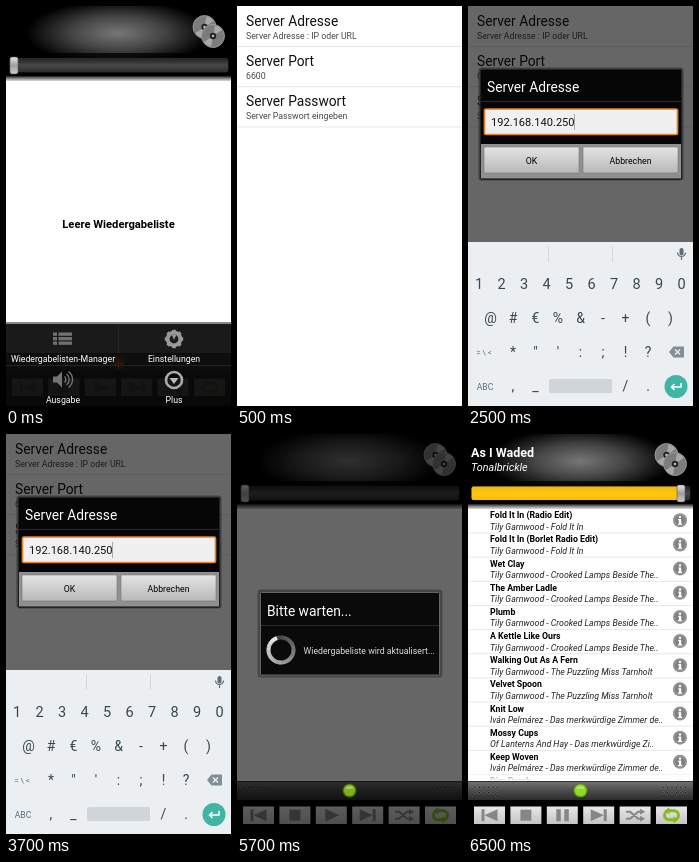
Recreate the animation shown at these times as an HTML page. Size 225 by 400 pixels, loop 8 s.

```html
<!DOCTYPE html>
<html lang="de">
<head>
<meta charset="utf-8">
<title>Musikspieler</title>
<style>
  html, body { margin: 0; width: 100%; height: 100%; overflow: hidden; background: #fff; }
  svg { display: block; width: 100%; height: 100%; }
  text { font: 8.75px Roboto, sans-serif; white-space: pre; }
  .b { font-weight: 700; }
  .i { font-style: italic; }
  .big { font-size: 13.75px; }
  .mid { text-anchor: middle; }
  .scene { display: none; }
</style>
</head>
<body>
<svg id="stage" viewBox="0 0 225 400" preserveAspectRatio="none"></svg>
<script>
const rect = (x, y, w, h, fill, more = '') =>
  `<rect x="${x}" y="${y}" width="${w}" height="${h}" fill="${fill}" ${more}/>`;
const circle = (x, y, r, fill, more = '') => `<circle cx="${x}" cy="${y}" r="${r}" fill="${fill}" ${more}/>`;
const path = (d, fill, more = '') => `<path d="${d}" fill="${fill}" ${more}/>`;
const line = (d, color, width = 1) => path(d, 'none', `stroke="${color}" stroke-width="${width}"`);
const text = (x, y, s, fill, cls = '', size = 0) =>
  `<text x="${x}" y="${y}" fill="${fill}" class="${cls}" ${size ? `style="font-size:${size}px"` : ''}>${s}</text>`;
const at = (x, y, s) => `<g transform="translate(${x} ${y})">${s}</g>`;
const range = n => [...Array(n).keys()];
const shade = (id, ...stops) => `<linearGradient id="${id}" x2="0" y2="1">` +
  stops.map((c, i) => `<stop offset="${i / (stops.length - 1)}" stop-color="${c}"/>`).join('') + '</linearGradient>';
const dim = rect(0, 0, 225, 400, '#000', 'opacity=".6"');

const defs = `<defs>
  <radialGradient id="glow"><stop stop-color="#777"/><stop offset=".5" stop-color="#444"/><stop offset="1" stop-color="#000"/></radialGradient>
  ${shade('groove', '#222', '#484848', '#2c2c2c')}
  ${shade('gold', '#f4b400', '#ffc814', '#fcbc00')}
  ${shade('knob', '#e4e4e4', '#a0a0a0', '#ccc')}
  ${shade('edge', '#1c1c1c', '#888', '#ddd')}
  ${shade('bar', '#747474', '#4c4c4c', '#2c2c2c')}
  ${shade('key', '#e8e8e8', '#c4c4c4')}
  ${shade('button', '#e4e4e4', '#b8b8b8')}
  ${shade('fade', '#fff0', '#fff')}
</defs>`;

// Player frame
const disc = (x, y) => at(x, y,
  circle(0, 0, 11.5, '#7c7c7c', 'stroke="#a4a4a4" stroke-width=".8"') +
  path('M0 0L2-10.5A11 11 0 0 1 9-6zM0 0L-2 10.5A11 11 0 0 1-9 6z', '#a8a8a8') +
  circle(0, 0, 3.2, '#222') + circle(0, 0, 1.3, '#bbb'));

const slider = (x, filled) =>
  rect(4, 52.5, 218, 13.5, 'url(#groove)', 'rx="2" stroke="#3c3c3c" stroke-width=".6"') +
  (filled ? rect(3.5, 52.5, x - 1.5, 13.5, 'url(#gold)', 'rx="2"') : '') +
  rect(x, 51, 8, 17, 'url(#knob)', 'rx="2" stroke="#555" stroke-width=".6"');

const ink = '#868686';
const glyphs = {
  prev: path('M-8-6h3v12h-3zM8-6v12L-5 0z', ink),
  stop: rect(-5.5, -5.5, 11, 11, ink),
  play: path('M-6-6.5L8 0-6 6.5z', ink),
  pause: path('M-6-6h4.5v12h-4.5zM2-6h4.5v12h-4.5z', ink),
  next: path('M5-6h3v12h-3zM-8-6v12L5 0z', ink),
  shuffle: line('M-9-3.5h4L3 3.5h3M-9 3.5h4L3-3.5h3', ink, 2) + path('M5-6.5l5 3-5 3zM5 .5l5 3-5 3z', ink),
  repeat: rect(-7, -4.5, 14, 9, 'none', 'rx="4.5" stroke="#86bc1c" stroke-width="3"') +
    path('M-2-8v7l-5-3.5zM2 8V1l5 3.5z', '#86bc1c')
};

const dots = x => range(12).map(i =>
  circle(x + (i % 6) * 4.5, 353.5 + (i / 6 | 0) * 5, 1, '#111', 'stroke="#999" stroke-width=".4"')).join('');
const orb = (ring, core) => circle(112.5, 356.5, 7, ring) + circle(112.5, 356.3, 5.8, core) +
  path('M108.5 355a4 3 0 0 1 8 0z', '#fff', 'opacity=".3"');

const player = (x, filled, middle) =>
  rect(0, 0, 225, 400, '#fff') + rect(0, 0, 225, 72, '#000') +
  '<ellipse cx="112" cy="27" rx="92" ry="33" fill="url(#glow)"/>' +
  rect(0, 47, 225, 25, '#000', 'opacity=".75"') +
  disc(198.5, 21) + disc(207, 30) + slider(x, filled) +
  rect(0, 70, 225, 5, 'url(#edge)') +
  rect(0, 347, 225, 53, '#000') + rect(0, 347, 225, 19, 'url(#bar)') +
  line('M0 347.5H225', '#333') + dots(7) + dots(195) + orb('#5c9a14', '#90d824') +
  ['prev', 'stop', middle, 'next', 'shuffle', 'repeat'].map((g, i) =>
    rect(6 + i * 36.4, 372.5, 31, 17.5, 'url(#key)') + at(21.5 + i * 36.4, 381.2, glyphs[g])).join('');

// Options menu over the empty playlist
const gear = range(8).map(i => rect(-1.8, -9.2, 3.6, 4, '#999', `transform="rotate(${i * 45})"`)).join('') +
  circle(0, 0, 8.3, '#999') + circle(0, 0, 4.4, '#1a1a1a') + path('M-2.4-4.4h4.8L0 1z', '#999');
const listIcon = [-6, -1.5, 3].map(y => rect(-9.5, y, 4, 3.3, '#707070') + rect(-4, y, 13.5, 3.3, '#707070')).join('');
const speaker = path('M-9.5-3h4l5-5V8l-5-5h-4z', '#747474') +
  line('M2-3a4 4 0 0 1 0 6M4-5.5a7 7 0 0 1 0 11M6-8a10 10 0 0 1 0 16', '#747474', 1.4);
const more = circle(0, 0, 8, 'none', 'stroke="#aaa" stroke-width="2.6"') + path('M-4.5-2h9L0 4z', '#bbb');

const menu = player(4, false, 'play') +
  text(112.5, 222, 'Leere Wiedergabeliste', '#000', 'b mid', 11.2) +
  rect(0, 318, 225, 82, '#0a0a0a', 'opacity=".94"') + rect(0, 318, 225, 29, '#1a1a1a') +
  rect(0, 316, 225, 2, '#888') + line('M112.5 318V347M0 359.5H225', '#242424') +
  line('M107 357.5h11M112.5 352v11', '#4a0c0c', 1.5) +
  at(56.5, 332.5, listIcon) + at(168, 333, gear) + at(56.5, 373.5, speaker) + at(168, 374, more) +
  text(57, 355.5, 'Wiedergabelisten-Manager', '#fff', 'mid') + text(168, 355.5, 'Einstellungen', '#fff', 'mid') +
  text(57, 397, 'Ausgabe', '#fff', 'mid') + text(168, 397, 'Plus', '#fff', 'mid');

// Server settings
const settings = rect(0, 0, 225, 400, '#fff') + [
  ['Server Adresse', 'Server Adresse : IP oder URL'],
  ['Server Port', '6600'],
  ['Server Passwort', 'Server Passwort eingeben']
].map(([name, note], i) => {
  const y = i * 40.2;
  return text(9, y + 19.6, name, '#111', 'big') + text(9, y + 32.8, note, '#484848') +
    line(`M0 ${y + 40.5}H225`, '#e6e6e6');
}).join('');

// Address dialog with keyboard
const keyRow = (keys, x, y, size) => [...keys].map((k, i) =>
  text(x + i * 22.5, y, k.replace('&', '&amp;'), '#37474f', 'mid', size)).join('');
const keyboard = rect(0, 236, 225, 164, '#eceff1') +
  line('M80.5 241V256M144.5 241V256', '#d2d7da') +
  at(213.5, 248, rect(-2, -6, 4, 7.5, '#607078', 'rx="2"') + line('M-4-1.5a4 4 0 0 0 8 0M0 2.5V6', '#607078', 1.2)) +
  keyRow('1234567890', 11.2, 283, 14.5) + keyRow('@#€%&-+()', 22.5, 317, 14) +
  keyRow('*"\':;!?', 45, 351, 14) +
  text(16, 349, '= \\ &lt;', '#546e7a', 'mid', 8) + text(17, 384, 'ABC', '#546e7a', 'mid', 8.5) +
  keyRow(',_', 45, 385, 14) + keyRow('/.', 157.5, 385, 14) +
  rect(81, 373, 63, 14, '#cfd5d8', 'rx="1.5"') +
  at(209, 346, path('M-8 0l4.5-5.5H7v11H-3.5z', '#80909a') + line('M-2-2.5l5 5M3-2.5l-5 5', '#eceff1', 1.3)) +
  circle(208, 380.5, 11.5, '#40b5a6') +
  line('M213 377v4h-9M206.5 378l-3 3 3 3', '#fff', 1.5);

const pushButton = (x, label) => rect(x, 141, 95, 26, 'url(#button)', 'rx="1" stroke="#777" stroke-width=".6"') +
  text(x + 47.5, 157.5, label, '#000', 'mid');
const address = settings + dim +
  rect(10.5, 61.5, 205, 113, '#333', 'rx="3" opacity=".75"') +
  rect(12.5, 63.5, 201, 110, '#060606', 'rx="1"') +
  text(19, 86, 'Server Adresse', '#fff', 'big') + line('M13 95.5H213', '#2a2a2a') +
  rect(16.5, 103, 193, 25.5, '#f0f0f0', 'rx="1.5" stroke="#e88424" stroke-width="1.7"') +
  text(23, 120, '192.168.140.250', '#111', '', 11.1) + line('M106.5 108V124', '#888', .7) +
  rect(13, 138, 200, 34.5, '#909090') + pushButton(16, 'OK') + pushButton(115, 'Abbrechen') + keyboard;

// Waiting dialog
const spinner = range(60).map(i => {
  const v = 70 + i * 2.9 | 0;
  return line('M0-12.5A12.5 12.5 0 0 1 1.6-12.4', `rgb(${v},${v},${v})`, `4" transform="rotate(${i * 6 - 20})`);
}).join('');
const waiting = player(4, false, 'play') + dim + orb('#40640c', '#80b018') +
  rect(20.5, 155.5, 185, 88, '#333', 'rx="3" opacity=".6"') +
  rect(23.5, 158.5, 179, 82.5, '#0a0a0a', 'rx="1" stroke="#666"') +
  text(30, 182, 'Bitte warten...', '#fff', 'big') + line('M24 191.5H202', '#2c2c2c') +
  at(44, 216, spinner) + text(66.5, 219.5, 'Wiedergabeliste wird aktualisert...', '#ddd');

// Filled playlist
const singer = 'Tily Garnwood - ', sampler = ' - Das merkwürdige Zimmer de..';
const lamps = singer + 'Crooked Lamps Beside The..';
const songs = [
  ['Fold It In (Radio Edit)', singer + 'Fold It In'],
  ['Fold It In (Borlet Radio Edit)', singer + 'Fold It In'],
  ['Wet Clay', lamps],
  ['The Amber Ladle', lamps],
  ['Plumb', lamps],
  ['A Kettle Like Ours', lamps],
  ['Walking Out As A Fern', singer + 'The Puzzling Miss Tarnholt'],
  ['Velvet Spoon', singer + 'The Puzzling Miss Tarnholt'],
  ['Knit Low', 'Iván Pelmárez' + sampler],
  ['Mossy Cups', 'Of Lanterns And Hay - Das merkwürdige Zi..'],
  ['Keep Woven', 'Iván Pelmárez' + sampler],
  ['Dim Porch', '']
];
const info = circle(0, 0, 7, '#8c8c8c') + circle(0, 0, 5.6, '#808080', 'stroke="#aaa" stroke-width=".6"') +
  circle(0, -3.2, 1.2, '#fff') + path('M-1.8-1.2h3v4.4h.9v1.2h-4.2v-1.2h1v-3.2h-.7z', '#fff');
const songRow = ([title, sub], i) => {
  const y = 75 + i * 24.15;
  return text(22, y + 9.3, title, '#000', 'b') + text(22, y + 20.8, sub, '#222', 'i') +
    line(`M0 ${y + 24}H225`, '#e2e2e2', .8) + at(212, y + 11.3, info);
};
const playing = player(209, true, 'pause') +
  text(3, 22.8, 'As I Waded', '#fff', 'b', 12.5) + text(3, 37, 'Tonalbrickle', '#fff', 'i', 10.8) +
  `<svg y="75" width="225" height="272" viewBox="0 75 225 272">${songs.map(songRow).join('')}` +
  rect(0, 335, 225, 12, 'url(#fade)') + '</svg>';

const scenes = [[0, menu], [500, settings], [2500, address], [4500, waiting], [6500, playing]];
const stage = document.getElementById('stage');
stage.innerHTML = defs + scenes.map(([, s]) => `<g class="scene">${s}</g>`).join('');
const groups = stage.querySelectorAll('.scene');

function draw(now) {
  const t = now % 8000;
  const current = scenes.filter(([start]) => start <= t).length - 1;
  groups.forEach((g, i) => { g.style.display = i === current ? 'inline' : 'none'; });
  requestAnimationFrame(draw);
}
draw(performance.now());
</script>
</body>
</html>
```
